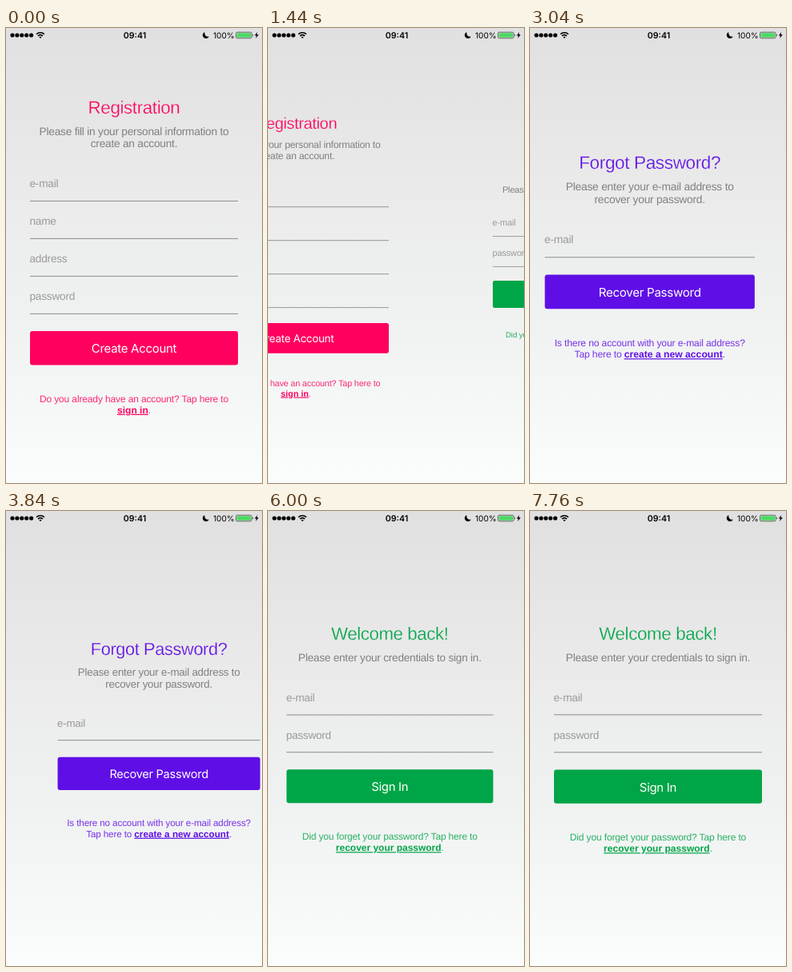
An HTML page that plays this animation: 320x569 px, repeating every 8 s.

```html
<!DOCTYPE html>
<html lang="en">
<head>
<meta charset="utf-8">
<title>Account forms</title>
<style>
  html, body { margin: 0; width: 100%; height: 100%; overflow: hidden; background: #eee; }
  svg { display: block; width: 100vw; height: 100vh; }
  text {
    font-family: "Liberation Sans", Arial, sans-serif;
    letter-spacing: -.0165em; text-rendering: geometricPrecision;
  }
  .mid { text-anchor: middle; }
  .title { font-size: 22.35px; stroke: #e9e9e9; stroke-width: .3; }
  .body { font-size: 13.7px; fill: #808080; }
  .label { font-size: 13.65px; fill: #9a9a9a; }
  .link { font-size: 12.05px; letter-spacing: -.013em; fill-opacity: .84; }
  .tap { font-weight: bold; letter-spacing: 0; text-decoration: underline; }
  .button { font: 400 15px Inter, sans-serif; letter-spacing: -.02em; fill: #fff; }
  .status { font-family: Inter, sans-serif; letter-spacing: 0; }
</style>
</head>
<body>
<svg viewBox="0 0 320 569" preserveAspectRatio="none">
  <defs>
    <linearGradient id="sky" x2="0" y2="1">
      <stop offset="0" stop-color="#e0e0e0"/>
      <stop offset=".35" stop-color="#eaeaea"/>
      <stop offset=".65" stop-color="#f0f2f2"/>
      <stop offset="1" stop-color="#fbfcfc"/>
    </linearGradient>
  </defs>
  <rect width="320" height="569" fill="url(#sky)"/>
  <g id="pages"></g>
  <g id="bar">
    <path d="M8 9H32" stroke="#000" stroke-width="5.2" stroke-linecap="round" stroke-dasharray="0 5.9"/>
    <g fill="none" stroke="#000" stroke-width="1.6">
      <path d="M38 7.8a7 7 0 0 1 10 0M40 9.9a4.2 4.2 0 0 1 6 0"/>
    </g>
    <path d="M41.4 11.4a2.3 2.3 0 0 1 3.2 0L43 13Z"/>
    <text class="status mid" x="161" y="12.7" font-size="10.6" font-weight="600">09:41</text>
    <path d="M248.4 5a4.2 4.2 0 1 0 5.4 5.6a4.3 4.3 0 0 1-5.4-5.6Z"/>
    <text class="status" x="259" y="12.7" font-size="10.1">100%</text>
    <rect x="287.5" y="5.2" width="19.6" height="7.6" rx="1.6" fill="none" stroke="#333" stroke-width=".7"/>
    <rect x="288.5" y="6.2" width="17.6" height="5.6" rx=".8" fill="#4cd964"/>
    <path d="M308 7.4q1.6 1.6 0 3.2Z"/>
    <path d="M314.2 5L310.8 9.4H313L312.2 13L315.8 8.3H313.5Z"/>
  </g>
</svg>
<script>
const LOOP = 8000, GAP = 351, MID_X = 160, MID_Y = 284.5;

const forms = [
  { color: '#ff005f', title: 'Registration', top: 216.4,
    intro: ['Please fill in your personal information to', 'create an account.'],
    fields: ['e-mail', 'name', 'address', 'password'], button: 'Create Account',
    ask: 'Do you already have an account? Tap here to', lead: '', tap: 'sign in' },
  { color: '#00a547', title: 'Welcome back!', top: 254.8,
    intro: ['Please enter your credentials to sign in.'],
    fields: ['e-mail', 'password'], button: 'Sign In',
    ask: 'Did you forget your password? Tap here to', lead: '', tap: 'recover your password' },
  { color: '#5f0fe6', title: 'Forgot Password?', top: 286.7,
    intro: ['Please enter your e-mail address to', 'recover your password.'],
    fields: ['e-mail'], button: 'Recover Password',
    ask: 'Is there no account with your e-mail address?', lead: 'Tap here to ', tap: 'create a new account' }
];

const centered = (cls, y, content, fill = '') =>
  `<text class="${cls} mid" x="160" y="${y}" ${fill && `fill="${fill}"`}>${content}</text>`;

function drawForm(f) {
  const introTop = f.top - 67 - (f.intro.length - 1) * 15.7;
  const box = f.top + (f.fields.length - 1) * 47 + 21.6;
  return '<g>' +
    centered('title', introTop - 27.2, f.title, f.color) +
    f.intro.map((line, i) => centered('body', introTop + i * 15.7, line)).join('') +
    f.fields.map((name, i) => {
      const y = f.top + i * 47;
      return `<text class="label" x="29.5" y="${y - 17.2}">${name}</text>` +
        `<path d="M30 ${y}H290" stroke="#8c8c8c"/>`;
    }).join('') +
    `<rect x="30" y="${box}" width="260" height="42.4" rx="3" fill="${f.color}"/>` +
    centered('button', box + 27.2, f.button) +
    centered('link', box + 88.6, f.ask, f.color) +
    centered('link', box + 102.8, `${f.lead}<tspan class="tap">${f.tap}</tspan>.`, f.color) +
    '</g>';
}

const holder = document.getElementById('pages');
holder.innerHTML = forms.map(drawForm).join('');
const pages = [...holder.children];
const taps = [...holder.querySelectorAll('.tap')];

// Underdamped step response, slightly overshooting 1
function spring(ms) {
  const t = Math.max(0, ms) / 1000, a = 10.45 * t;
  return 1 - Math.exp(-11 * t) * (Math.cos(a) + 1.053 * Math.sin(a));
}
const part = (t, from, to) => Math.min(1, Math.max(0, (t - from) / (to - from)));
const smooth = u => u * u * (3 - 2 * u);

// Scroll position in pages: slow drags followed by spring releases
function scrollAt(t) {
  if (t < 1400) return .25 * part(t, 900, 1400) ** 2;
  if (t < 2690) return .25 + .75 * spring(t - 1400);
  if (t < 3480) return 1 + spring(t - 2690);
  if (t < 4485) return 2 - .687 * part(t, 3480, 4485) ** 2;
  if (t < 5880) return 1 + .313 * (1 - spring(t - 4485));
  if (t < 6960) return 1 + .563 * smooth(part(t, 5880, 6900));
  return 1 + .563 * (1 - spring(t - 6960));
}

const presses = [[640, 0], [2320, 1], [5600, 1]];

function draw(now) {
  const t = now % LOOP, scroll = scrollAt(t);
  pages.forEach((page, i) => {
    const p = i - scroll;
    const scale = 1 - .3 * (i === pages.length - 1 ? p : Math.abs(p));
    page.setAttribute('transform',
      `translate(${MID_X + GAP * p} ${MID_Y}) scale(${scale}) translate(${-MID_X} ${-MID_Y})`);
    const pressed = presses.some(([at, n]) => n === i && t >= at && t < at + 160);
    taps[i].setAttribute('fill-opacity', pressed ? .6 : 1);
  });
}

const start = performance.now();
function tick() {
  draw(performance.now() - start);
  requestAnimationFrame(tick);
}
tick();
</script>
</body>
</html>
```
